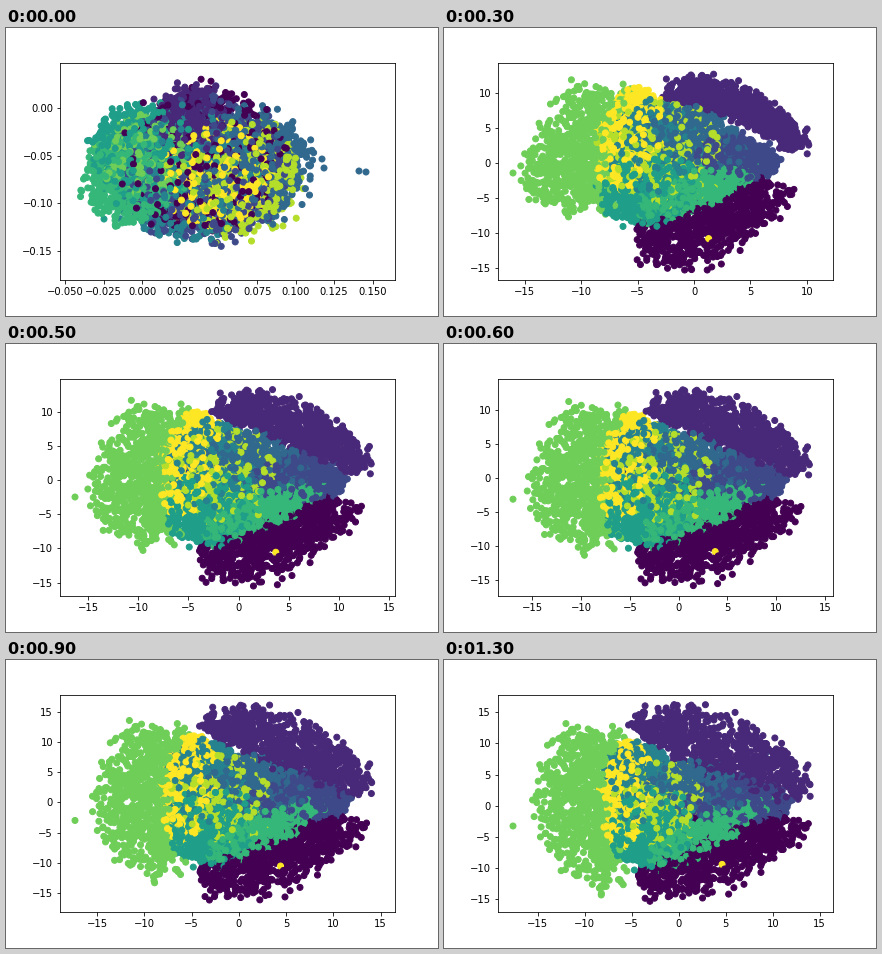
A matplotlib script that plays this animation: 432x288 px, repeating every 1500 ms.

```python
import numpy as np
import matplotlib.pyplot as plt
from matplotlib.animation import FuncAnimation

TICKS, LAST, COUNT = 15, 13, 8000
WIDTH, HEIGHT = 432, 288

# Axis limits (left, right, bottom, top), untrained and then every second tick.
START_LIMITS = (-0.0534, 0.1645, -0.181, 0.0478)
LIMITS = [(-12.5, 8.8, -12.2, 10.5), (-17.38, 12.3, -16.7, 14.35),
          (-17.8, 15.57, -16.96, 14.83), (-19.2, 16.03, -17.65, 14.33),
          (-18.94, 16.49, -18.16, 17.9), (-19.2, 17.92, -16.41, 16.94),
          (-19.23, 16.39, -17.06, 17.84)]

# All shapes are in stage pixels. Untrained disc of each label: cx, cy, radius.
START = [(195, 132, 74), (184, 92, 28), (200, 142, 74), (240, 138, 57), (180, 145, 66),
         (140, 125, 50), (128, 150, 44), (142, 128, 38), (228, 150, 56), (208, 145, 52)]
STRAYS = [(316, 131), (318, 140), (353, 143), (360, 144)]
STRAY_LABEL = 3

# Inner clusters: early and late ellipse (cx, cy, rx, ry, degrees).
INNER = {
    2: ((292, 130, 42, 19, 5), (293, 142, 53, 21, 0)),
    3: ((250, 112, 50, 30, 20), (250, 130, 48, 26, 10)),
    4: ((210, 118, 48, 45, 0), (195, 122, 36, 38, 0)),
    5: ((205, 160, 52, 34, -10), (208, 166, 45, 40, -15)),
    6: ((252, 162, 62, 18, -20), (265, 172, 68, 16, -27)),
    8: ((215, 125, 60, 50, 0), (215, 142, 42, 38, 0)),
    9: ((184, 112, 30, 53, 18), (182, 134, 24, 52, 8))}

# Outer clusters: early and late band, three points on the inner then the outer edge.
OUTER = {
    0: (((195, 195), (262, 178), (312, 153), (185, 232), (275, 238), (360, 163)),
        ((195, 212), (262, 180), (330, 157), (192, 240), (298, 226), (373, 166))),
    1: (((220, 72), (285, 87), (350, 122), (225, 50), (305, 60), (373, 118)),
        ((185, 65), (255, 108), (358, 140), (205, 45), (305, 60), (372, 122))),
    7: (((192, 62), (162, 125), (175, 182), (125, 52), (78, 130), (95, 182)),
        ((180, 72), (162, 140), (188, 218), (120, 64), (88, 145), (140, 236)))}
LONER, LONER_LABEL = ((69, 145), (69, 166)), 7

rng = np.random.default_rng(7)
labels = rng.integers(0, 10, COUNT)
shades = np.where(rng.random(COUNT) < 0.004, rng.integers(0, 10, COUNT), labels)
radius = rng.random(COUNT) ** 0.6
angle = rng.uniform(0, 2 * np.pi, COUNT)
along = rng.beta(1.35, 1.35, COUNT)
across = rng.beta(1.1, 1.7, COUNT)
fuzz = rng.normal(0, 3, (COUNT, 2))

strays = np.flatnonzero(shades == STRAY_LABEL)[:len(STRAYS)]
loner = np.flatnonzero(shades == LONER_LABEL)[0]


def tween(keys, position):
    keys = np.asarray(keys, float)
    low = int(np.clip(position, 0, len(keys) - 2))
    part = np.clip(position - low, 0, 1)
    return keys[low] + part * (keys[low + 1] - keys[low])


def in_ellipse(shape, mask):
    cx, cy, rx, ry, degrees = shape
    a = rx * radius[mask] * np.cos(angle[mask])
    b = ry * radius[mask] * np.sin(angle[mask])
    c, s = np.cos(np.radians(degrees)), np.sin(np.radians(degrees))
    return np.column_stack((cx + a * c - b * s, cy + a * s + b * c))


def in_band(edges, mask):
    t, v = along[mask], across[mask, None]
    weights = np.column_stack(((1 - t) * (1 - 2 * t), 4 * t * (1 - t), t * (2 * t - 1)))
    return (1 - v) * (weights @ edges[:3]) + v * (weights @ edges[3:])


def untrained():
    points = 2 * fuzz
    for label, (cx, cy, size) in enumerate(START):
        mask = labels == label
        points[mask] += in_ellipse((cx, cy, 1.08 * size, 0.95 * size, 0), mask)
    points[strays] = STRAYS
    return points


first_points = untrained()


def trained(tick):
    progress = max(0, (tick - 3) / (LAST - 3)) ** 0.6
    points = fuzz.copy()
    for clusters, fill in ((INNER, in_ellipse), (OUTER, in_band)):
        for label, shapes in clusters.items():
            mask = labels == label
            points[mask] += fill(tween(shapes, progress), mask)
    spread = np.interp(tick, [1, 3], [0.85, 1])
    points = first_points + spread * (points - first_points)
    points[loner] = tween(LONER, progress)
    return np.clip(points, (69, 44.4), (373.6, 242))


fig, ax = plt.subplots(figsize=(WIDTH / 72, HEIGHT / 72), dpi=72)
fig.subplots_adjust(left=0.125, right=0.9, bottom=0.125, top=0.88)
dots = ax.scatter(*first_points.T, c=shades, cmap="viridis", vmin=0, vmax=9)


def draw(frame):
    tick = min(frame, LAST)
    if tick == 0:
        limits, points = START_LIMITS, first_points
    else:
        limits, points = tween(LIMITS, (tick - 1) / 2), trained(tick)
    left, right, bottom, top = limits
    ax.set_xlim(left, right)
    ax.set_ylim(bottom, top)
    box = ax.get_position()
    x = (points[:, 0] / WIDTH - box.x0) / box.width
    y = (1 - points[:, 1] / HEIGHT - box.y0) / box.height
    dots.set_offsets(np.column_stack((left + x * (right - left),
                                      bottom + y * (top - bottom))))
    return dots,


anim = FuncAnimation(fig, draw, frames=TICKS, interval=100, repeat=True)
plt.show()
```
